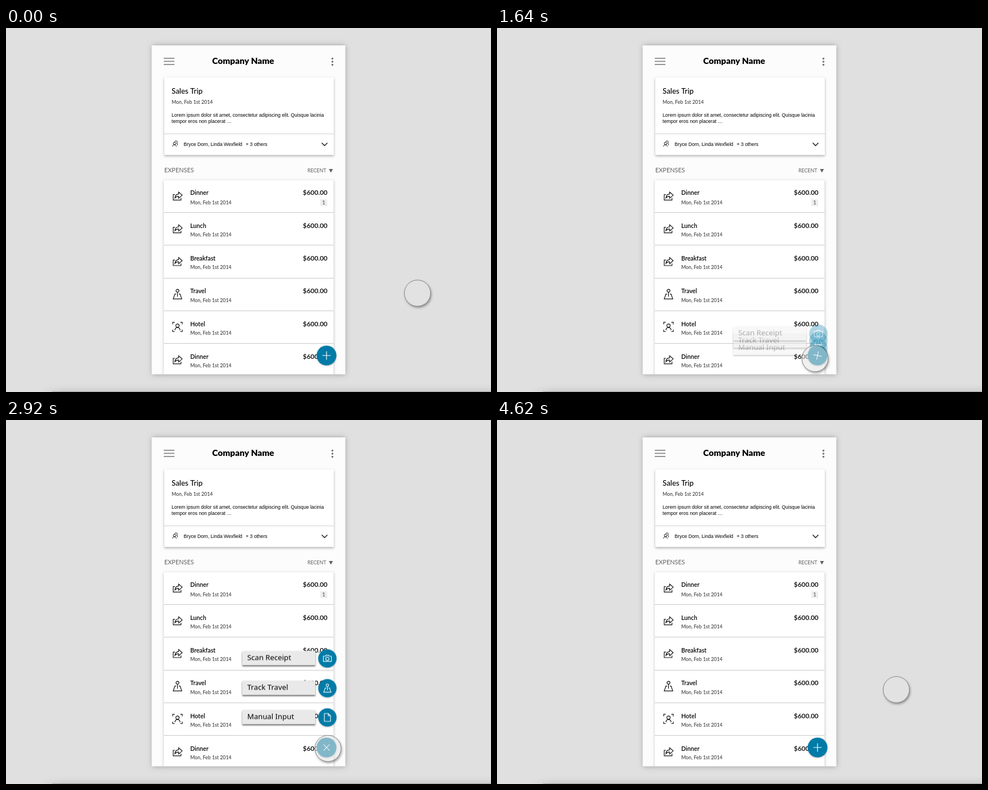
These frames come from a looping animation (864 by 648 pixels, 4640 ms). An HTML page with a canvas:

```html
<!DOCTYPE html>
<html lang="en">
<head>
<meta charset="utf-8">
<title>Expenses menu</title>
<style>
html, body { margin: 0; width: 100%; height: 100%; overflow: hidden; background: #e0e0e0; }
canvas { display: block; width: 864px; height: 648px; }
</style>
</head>
<body>
<canvas id="stage" width="864" height="648"></canvas>
<script>
const W = 864, H = 648, LOOP = 4640, STEP = 20;
const BLUE = '#007ba7', INK = '#111', GREY = '#606060';
const GEO = 'Lato, sans-serif', BODY = '"Liberation Sans", Arial, sans-serif', LABEL = '"Noto Sans", sans-serif';
const ctx = document.getElementById('stage').getContext('2d');

// ---- drawing helpers ----
function makeLayer(w, h, draw) {
  const canvas = document.createElement('canvas');
  canvas.width = w;
  canvas.height = h;
  draw(canvas.getContext('2d'));
  return canvas;
}

function text(c, str, x, y, font, color = INK, align = 'left') {
  c.font = font;
  c.fillStyle = color;
  c.textAlign = align;
  c.fillText(str, x, y);
}

function withShadow(c, dx, dy, blur, alpha, draw) {
  c.save();
  c.shadowColor = `rgba(0,0,0,${alpha})`;
  c.shadowBlur = blur;
  c.shadowOffsetX = dx;
  c.shadowOffsetY = dy;
  draw();
  c.restore();
}

function box(c, x, y, w, h, color) {
  c.fillStyle = color;
  c.fillRect(x, y, w, h);
}

function disc(c, x, y, r, color) {
  c.fillStyle = color;
  c.beginPath();
  c.arc(x, y, r, 0, Math.PI * 2);
  c.fill();
}

function strokePath(c, d, x, y, color = INK, width = 1.2, scale = 1) {
  c.save();
  c.translate(x, y);
  c.scale(scale, scale);
  c.strokeStyle = color;
  c.lineWidth = width / scale;
  c.stroke(new Path2D(d));
  c.restore();
}

// Icon outlines around their own centre.
const ICONS = {
  share: 'M-4.5-2.5H-7.6V7.4H6.2V3.6 M-4.6 3.6C-4.2-1.4-1.6-3.2 2-3.3V-7L8.4-1.4L2 4.2V.6C-1 .5-3 1.4-4.6 3.6Z',
  travel: 'M-2.6-6.2A2.6 2.6 0 1 0 2.6-6.2A2.6 2.6 0 1 0-2.6-6.2Z M0-3.6V4.4 M-2.4-.2H-4.6L-7.6 8.4H7.6L4.6-.2H2.4',
  hotel: 'M-8.5-4.8V-8.3H-5 M5-8.3H8.5V-4.8 M8.5 4.8V8.3H5 M-5 8.3H-8.5V4.8' +
    'M-3-2.4A3 3 0 1 0 3-2.4A3 3 0 1 0-3-2.4Z M-4.6 6C-4.4 2.4-2.4 1 0 .9C2.4 1 4.4 2.4 4.6 6',
  people: 'M-3-.4A2.3 2.3 0 1 0 1.6-.4A2.3 2.3 0 1 0-3-.4Z M-4.4 5C-4.2 2.8-2.6 2-.7 1.9C1 2 2.2 2.8 2.4 5' +
    'M-.4-3.4A2.3 2.3 0 1 1 3.4-1.1C4 .1 4.6 1 4.8 2.6',
  camera: 'M-7.2-4H-3.6L-2.6-5.6H2.6L3.6-4H7.2V5.4H-7.2Z M-3 .6A3 3 0 1 0 3 .6A3 3 0 1 0-3 .6Z',
  page: 'M-5.4-7H1.6L5.6-3V7H-5.4Z M1.6-7V-3H5.6'
};

// ---- static screen ----
const ROWS = [
  ['Dinner', 'share'], ['Lunch', 'share'], ['Breakfast', 'share'],
  ['Travel', 'travel'], ['Hotel', 'hotel'], ['Dinner', 'share']
];
const DATE = 'Mon, Feb 1st 2014', DATE_FONT = '500 8.8px ' + GEO, DATE_INK = '#3a3a3a';

function drawBackdrop(c) {
  box(c, 0, 0, W, H, '#e0e0e0');
  for (let y = 630; y < H; y++) {
    const a = 0.1 * ((y - 630) / 18) ** 2;
    const fade = c.createLinearGradient(60, 0, 100, 0);
    fade.addColorStop(0, 'rgba(0,0,0,0)');
    fade.addColorStop(1, `rgba(0,0,0,${a})`);
    box(c, 60, y, W - 60, 1, fade);
  }
  box(c, 82, 647, W - 82, 1, 'rgba(0,0,0,.2)');
}

function drawHeader(c) {
  for (const y of [54, 59.5, 65]) box(c, 281, y - 1, 19, 1.8, '#8a8a8a');
  for (const y of [54.5, 60, 65.5]) disc(c, 581.5, y, 1.8, '#777');
  text(c, 'Company Name', 422.5, 64, '900 15.4px ' + GEO, '#000', 'center');
}

function drawTripCard(c) {
  withShadow(c, 0, 1.5, 4, 0.3, () => box(c, 282, 88, 302, 138, '#fff'));
  box(c, 282, 188, 302, 1, '#cfcfcf');
  text(c, 'Sales Trip', 295, 117, '500 13.3px ' + GEO, '#000');
  text(c, DATE, 295, 135, DATE_FONT, DATE_INK);
  const body = '8.65px ' + BODY;
  text(c, 'Lorem ipsum dolor sit amet, consectetur adipiscing elit. Quisque lacinia', 295, 158, body, '#000');
  text(c, 'tempor eros non placerat …', 295, 168.5, body, '#000');
  strokePath(c, ICONS.people, 301, 206, INK, 1);
  text(c, 'Bryce Dorn, Linda Wexfield', 316.5, 209.5, body, '#000');
  text(c, '+ 3 others', 427, 209.5, body, '#000');
  strokePath(c, 'M-5-2.5L0 2.5L5-2.5', 567.5, 207, INK, 1.4);
}

function drawList(c) {
  text(c, 'EXPENSES', 282, 257, '10.9px ' + GEO, GREY);
  text(c, 'RECENT', 570.5, 257, '8.9px ' + GEO, GREY, 'right');
  c.fillStyle = GREY;
  c.fill(new Path2D('M575.3 251H582.3L578.8 257.5Z'));

  withShadow(c, 0, 1, 4, 0.25, () => box(c, 281, 271, 302.5, 360, '#fff'));
  ROWS.forEach(([name, icon], i) => {
    const y = 293.3 + i * 58.3;
    if (i) box(c, 281, Math.round(y - 23.5), 302.5, 1, '#c8c8c8');
    strokePath(c, ICONS[icon], 305.5, y + 5.7);
    text(c, name, 328.3, y + 4, '600 10.7px ' + GEO, '#000');
    text(c, DATE, 328.3, y + (i ? 19.3 : 21), DATE_FONT, DATE_INK);
    text(c, '$600.00', 572.7, y + 4, '600 11.8px ' + GEO, '#000', 'right');
  });
  box(c, 560, 305, 12, 12, '#ededed');
  text(c, '1', 566, 314.3, '9.2px ' + GEO, '#444', 'center');
}

const screenImage = makeLayer(W, H, c => {
  drawBackdrop(c);
  withShadow(c, 0, 0, 9, 0.28, () => box(c, 259.5, 31, 345, 585.5, '#fcfcfc'));
  c.beginPath();
  c.rect(259.5, 31, 345, 585.5);
  c.clip();
  drawHeader(c);
  drawTripCard(c);
  drawList(c);
});

// ---- menu entries, each flattened so that it fades as one piece ----
const FAB = { x: 571, y: 583 };
const ENTRY = { x: 410, w: 190, h: 50 };

function makeEntry(name, icon, target) {
  const image = makeLayer(ENTRY.w, ENTRY.h, c => {
    c.translate(-ENTRY.x, ENTRY.h / 2);
    withShadow(c, 0, 2, 2.5, 0.6, () => box(c, 421, -13.5, 130, 25.5, '#e9e9e9'));
    text(c, name, 429.7, 2.5, '13.2px ' + LABEL, '#000');
    withShadow(c, 0, 1, 3, 0.25, () => disc(c, 572.5, 0, 16.3, BLUE));
    strokePath(c, ICONS[icon], 572.5, 0, '#fff', 1.1, icon === 'travel' ? 0.85 : 1);
  });
  return { image, target };
}

// Lowest first, so that the top entry covers the others while stacked.
const MENU = [
  makeEntry('Manual Input', 'page', 529.5),
  makeEntry('Track Travel', 'travel', 477.4),
  makeEntry('Scan Receipt', 'camera', 424.5)
];

// ---- motion ----
// Slow start, then a long settling tail.
function settle(u) {
  u = Math.min(1, Math.max(0, u));
  return 1 - (1 - u ** 1.85) ** 7.6;
}

const openness = t => settle((t - 1580) / 360) - settle((t - 3060) / 360);

// Pointer keys: time, x, y.
const KEYS = [
  [0, 733, 472], [260, 733, 472], [800, 588.3, 566], [1280, 566.5, 588.5],
  [2140, 566.5, 588.5], [2400, 574, 584.5], [2620, 574, 584.5], [2920, 573.5, 584.7],
  [3180, 573.5, 584.7], [3600, 658.5, 576], [3660, 673, 573], [3840, 684.2, 572],
  [4540, 684.2, 572], [4600, 702, 509], [4620, 711.3, 480], [4640, 720, 455]
];

// Monotone slope at key i, so that rests stay still.
function slope(i, k) {
  const a = KEYS[i - 1], b = KEYS[i], c = KEYS[i + 1];
  if (!a || !c) return 0;
  const before = (b[k] - a[k]) / (b[0] - a[0]), after = (c[k] - b[k]) / (c[0] - b[0]);
  if (before * after <= 0) return 0;
  const mean = Math.abs((c[k] - a[k]) / (c[0] - a[0]));
  return Math.sign(after) * Math.min(mean, 3 * Math.abs(before), 3 * Math.abs(after));
}

function pointerAt(t) {
  const i = KEYS.findIndex((key, n) => n + 1 < KEYS.length && t < KEYS[n + 1][0]);
  const a = KEYS[i], b = KEYS[i + 1], h = b[0] - a[0], u = (t - a[0]) / h;
  return [1, 2].map(k =>
    a[k] * (1 + 2 * u) * (1 - u) ** 2 + b[k] * u * u * (3 - 2 * u) +
    h * (slope(i, k) * u * (1 - u) ** 2 - slope(i + 1, k) * u * u * (1 - u)));
}

// ---- moving parts ----
function drawMenu(p) {
  if (p < 0.002) return;
  ctx.save();
  ctx.globalAlpha = Math.min(1, p * 1.3);
  for (const { image, target } of MENU) {
    const y = FAB.y + (target - FAB.y) * p;
    ctx.drawImage(image, ENTRY.x, y - ENTRY.h / 2);
  }
  ctx.restore();
}

function drawFab(p) {
  withShadow(ctx, 0, 1, 3, 0.3, () => disc(ctx, FAB.x, FAB.y, 17.6, BLUE));
  ctx.save();
  ctx.translate(FAB.x, FAB.y);
  ctx.rotate(p * Math.PI / 4);
  strokePath(ctx, 'M-7.5 0H7.5M0-7.5V7.5', 0, 0, '#fff', 1.2);
  ctx.restore();
}

function drawPointer(x, y) {
  const r = 23.3;
  // The shadow shows only outside the see-through disc.
  ctx.save();
  ctx.beginPath();
  ctx.rect(0, 0, W, H);
  ctx.arc(x, y, r, 0, Math.PI * 2);
  ctx.clip('evenodd');
  withShadow(ctx, 1.5, 2.5, 4, 0.4, () => disc(ctx, x, y, r, '#888'));
  ctx.restore();

  disc(ctx, x, y, r, 'rgba(228,228,228,.57)');
  ctx.strokeStyle = '#888';
  ctx.lineWidth = 1;
  ctx.stroke();
}

const start = performance.now();

function frame(now) {
  const elapsed = Math.max(0, now - start) % LOOP;
  const t = Math.floor(elapsed / STEP) * STEP;
  const p = openness(t);
  ctx.drawImage(screenImage, 0, 0);
  drawMenu(p);
  drawFab(p);
  drawPointer(...pointerAt(t));
  requestAnimationFrame(frame);
}
frame(start);
</script>
</body>
</html>
```
